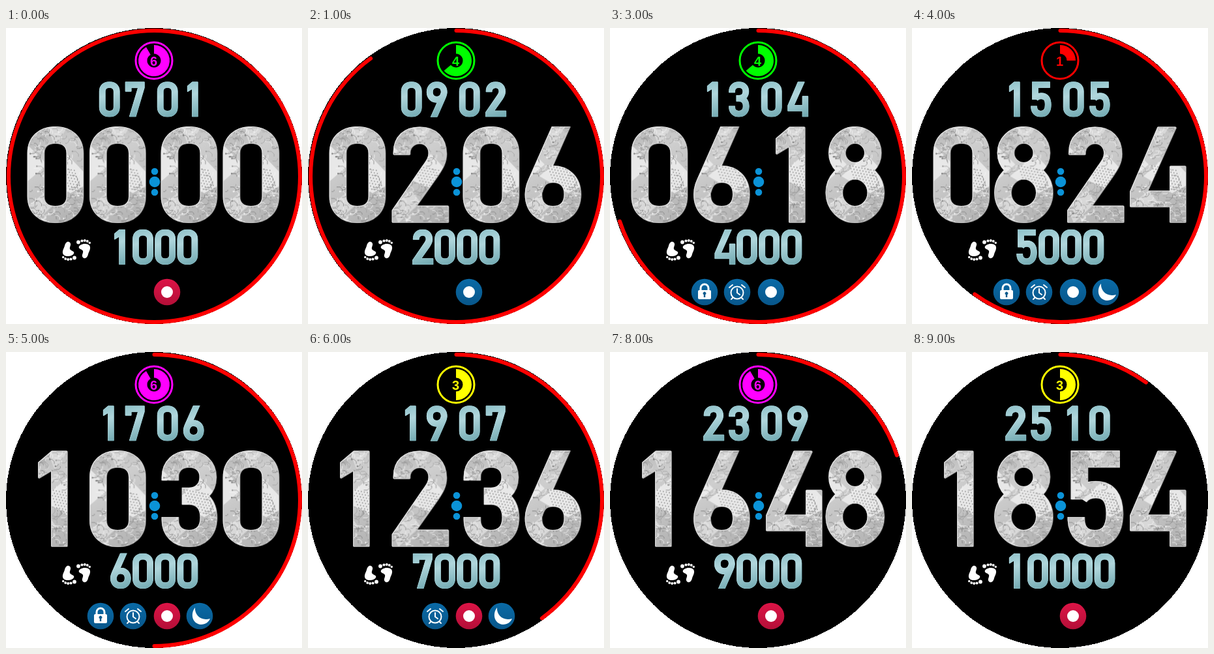
Animation of 454 by 454 pixels, one loop 10 s. Source, as an HTML page:

```html
<!DOCTYPE html>
<html lang="en">
<head>
<meta charset="utf-8">
<title>Watch face</title>
<style>
html, body { margin: 0; width: 100%; height: 100%; overflow: hidden; background: #fff; }
svg { display: block; width: 100vw; height: 100vh; }
text { font: bold 20px "Liberation Sans", Arial, sans-serif; text-anchor: middle; }
</style>
</head>
<body>
<svg viewBox="0 0 454 454">
  <defs>
    <clipPath id="cell"><path d="M-5 0H93V148H-5Z"/></clipPath>
    <pattern id="metal" width="100" height="160" patternUnits="userSpaceOnUse"></pattern>
    <linearGradient id="sheen" gradientUnits="userSpaceOnUse" x1="0" y1="0" x2="100" y2="160">
      <stop offset="0" stop-color="#b4b4b4"/><stop offset=".3" stop-color="#cecece"/>
      <stop offset=".6" stop-color="#c0c0c0"/><stop offset="1" stop-color="#a9a9a9"/>
    </linearGradient>
    <linearGradient id="teal" gradientUnits="userSpaceOnUse" x1="0" y1="0" x2="50" y2="150">
      <stop offset="0" stop-color="#8cc0c8"/><stop offset=".4" stop-color="#b0d6dc"/>
      <stop offset="1" stop-color="#74abb3"/>
    </linearGradient>
    <linearGradient id="blue" x2="0" y2="1">
      <stop offset="0" stop-color="#0a6aa6"/><stop offset="1" stop-color="#08568a"/>
    </linearGradient>
    <linearGradient id="red" x2="0" y2="1">
      <stop offset="0" stop-color="#dc1446"/><stop offset="1" stop-color="#b40f38"/>
    </linearGradient>
    <g id="foot">
      <path d="M112 335C114 331 124 329 128 333.500C131 338 127 343 126 347C125 352 121 355 118 352C115 349 119 345 118 342C117 339 110 339 112 335Z"/>
      <circle cx="111" cy="328.500" r="2.900"/><circle cx="116.500" cy="326.500" r="2.100"/>
      <circle cx="120.800" cy="326" r="2"/><circle cx="124.800" cy="327" r="1.900"/>
      <circle cx="128.300" cy="329.500" r="1.700"/>
    </g>
  </defs>
  <circle cx="227" cy="227" r="227" shape-rendering="crispEdges"/>
  <circle id="arc" cx="227.500" cy="227.500" r="223.500" fill="none" stroke="#f00" stroke-width="6"
    stroke-linecap="round" pathLength="10" transform="rotate(-90 227.500 227.500)"/>
  <g id="face"></g>
  <g fill="#0b93d8">
    <circle cx="228" cy="220" r="5.300"/><circle cx="228" cy="236" r="8.300"/><circle cx="228" cy="252" r="5.300"/>
  </g>
  <g fill="#fff"><use href="#foot"/><use href="#foot" transform="rotate(180 108 340.500)"/></g>
</svg>
<script>
const $ = id => document.getElementById(id);

// Digits in an 86 x 148 box: stroked centre lines and solid outlines
const LINES = {
  0: 'M13 41C13 23 25 13 43 13S73 23 73 41V107C73 125 61 135 43 135S13 125 13 107Z',
  3: 'M14 46V41C14 24 26 13 43 13S72 24 72 41S60 70 43 70H32H43C61 70 73 82 73 103S60 135 43 135S14 124 14 106V102',
  5: 'M81 13H19V75M19 72C25 63 34 60 44 60C64 60 73 73 73 97C73 122 62 135 43 135C26 135 15 126 14 106V102',
  6: 'M59 -8L20 80C15 91 13 96 13 104C13 124 26 135 43 135S73 124 73 104S60 73 43 73S18 82 14 98',
  8: 'M43 13A27.500 27.500 0 0 1 43 68A27.500 27.500 0 0 1 43 13ZM43 68A32 33.500 0 0 1 43 135A32 33.500 0 0 1 43 68Z',
  9: 'M27 156L66 68C71 57 73 52 73 44C73 24 60 13 43 13S13 24 13 44S26 75 43 75S68 66 72 50'
};
const SOLID = {
  1: 'M18 19L38 2H60V146H38V29L18 41Z',
  2: 'M4 42V40C4 16 20 2 43 2C68 2 83 18 83 42C83 56 76 66 70 75L36 123H86V146H2V129L48 62C56 51 58 47 58 41C58 32 52 25 43 25S27 32 27 40V42Z',
  4: 'M45 2H71L27 100H64V62H86V122H86V146H64V122H3V100Z',
  7: 'M4 2H82V25L46 146H21L57 25H27V40H4Z'
};
const DAYS = { 1: ['#f00', 90], 3: ['#ff0', 180], 4: ['#0f0', 230], 6: ['#f0f', 330] };

function buildMetal() {
  let seed = 7;
  const rnd = n => (seed = seed * 16807 % 2147483647) / 2147483647 * n;
  let s = '<path fill="url(#sheen)" d="M0 0H100V160H0Z"/>' +
    '<path fill="#e8e8e8" d="M0 28L30 58L0 84ZM60 42L100 84L66 102L22 76Z"/>' +
    '<path fill="#d8d8d8" d="M30 0H62L42 30ZM0 122L30 98L44 116L10 148Z"/>';
  for (let i = 0; i < 330; i++) {
    const x = rnd(96), y = rnd(150), a = 2 + rnd(6), b = (rnd(2) < 1 ? -1 : 1) * (1 + rnd(4));
    if (y > 50 && y < 92 && rnd(1) < .75) continue;
    const color = ['#808080', '#a0a0a0', '#f4f4f4'][i % 3];
    s += `<path d="M${x} ${y}h${a}l${Math.abs(b)} ${b}v${b}" fill="none" stroke="${color}" stroke-width=".8"/>`;
    if (i % 5 == 0) s += `<circle cx="${x}" cy="${y}" r="1.200" fill="${color}"/>`;
  }
  for (let r = 0; r < 8; r++)
    for (let c = 0; c < 9; c++)
      s += `<circle cx="${35 + c * 4.6 + r * 1.6}" cy="${60 + r * 4.6 + c * .9}" r=".9" fill="#909090"/>`;
  $('metal').innerHTML = s;
}

// trim narrows the glyph so that layers form a bevel
function glyph(n, paint, trim = 0) {
  const look = LINES[n] ? `fill="none" stroke-width="${27 - trim}" stroke-miterlimit="4"`
    : `fill="${paint}" stroke-width="${4 - trim}" stroke-linejoin="round"`;
  return `<g clip-path="url(#cell)"><path d="${LINES[n] || SOLID[n]}" stroke="${paint}" ${look}/></g>`;
}

function digit(n, x, y, scale, paint, dark, light) {
  return `<g transform="translate(${x} ${y}) scale(${scale})">${glyph(n, dark)}` +
    `<g transform="translate(-.4 -.4)">${glyph(n, light, 1)}</g>${glyph(n, paint, 2.4)}</g>`;
}
const big = (n, x) => digit(n, x, 151.3, 1, 'url(#metal)', '#777', '#e4e4e4');
const small = (n, x, y) => digit(n, x, y, .367, 'url(#teal)', '#4f8890', '#bcdde2');
const row = (text, xs, draw) => [...text].map((n, i) => draw(n, xs[i])).join('');
const pad = n => String(n).padStart(2, '0');

function point(deg, r) {
  const a = deg * Math.PI / 180;
  return `${227 + r * Math.sin(a)} ${50 - r * Math.cos(a)}`;
}

function dayDial(n) {
  const [color, deg] = DAYS[n], far = deg > 180 ? 1 : 0;
  return `<circle cx="227" cy="50" r="28" fill="none" stroke="${color}" stroke-width="3"/>` +
    `<path fill="${color}" d="M${point(0, 24)}A24 24 0 ${far} 1 ${point(deg, 24)}L${point(deg, 10.5)}A10.500 10.500 0 ${far} 0 ${point(0, 10.5)}Z"/>` +
    `<text x="226.500" y="57.500" fill="${color}">${n}</text>`;
}

const badge = (x, art, paint = 'blue') =>
  `<circle cx="${x}" cy="405" r="20.300" fill="url(#${paint})"/>` +
  `<g transform="translate(${x} 405)" fill="#fff">${art}</g>`;
const ICONS = {
  lock: '<path d="M-6 -3V-6A6 6 0 0 1 6 -6V-3" fill="none" stroke="#fff" stroke-width="3"/>' +
    '<rect x="-10" y="-3" width="20" height="14" rx="2"/><path d="M-1.200 8V4A2.300 2.300 0 1 1 1.200 4V8Z" fill="#0d5a8c"/>',
  alarm: '<g fill="none" stroke="#fff" stroke-width="2" stroke-linecap="round"><circle cy="1" r="9.500"/>' +
    '<path d="M0 -5V1L4 4M-12 -7L-7 -11M12 -7L7 -11M-7 9L-9 11M7 9L9 11"/></g>',
  link: '<circle r="9"/>',
  moon: '<path d="M-7 -13C-15 -3 -11 12 2 13C9 13 14 9 16 4C3 8 -8 -1 -7 -13Z"/>'
};

function draw(k) {
  const on = from => k >= from && k < from + 4;
  const steps = String(1000 * (k + 1));
  const left = 227 - (steps.length * 34.2 - 3) / 2;
  $('arc').setAttribute('stroke-dasharray', `${10 - k} 10`);
  $('face').innerHTML =
    dayDial(new Date(2017, k, 7 + 2 * k).getDay()) +
    row(pad(7 + 2 * k) + pad(k + 1), [143, 182, 232, 272], (n, x) => small(n, x, 82.3)) +
    row(pad(2 * k) + pad(6 * k), [33, 128.5, 238, 333], big) +
    row(steps, [...steps].map((_, i) => left + i * 34.2), (n, x) => small(n, x, 308.8)) +
    (on(2) ? badge(145, ICONS.lock) : '') +
    (on(3) ? badge(195, ICONS.alarm) : '') +
    badge(247, ICONS.link, on(1) ? 'blue' : 'red') +
    (on(4) ? badge(297, ICONS.moon) : '');
}

let shown = -1;
function tick() {
  const k = Math.floor(performance.now() / 1000) % 10;
  if (k !== shown) draw(shown = k);
  requestAnimationFrame(tick);
}
buildMetal();
tick();
</script>
</body>
</html>
```
